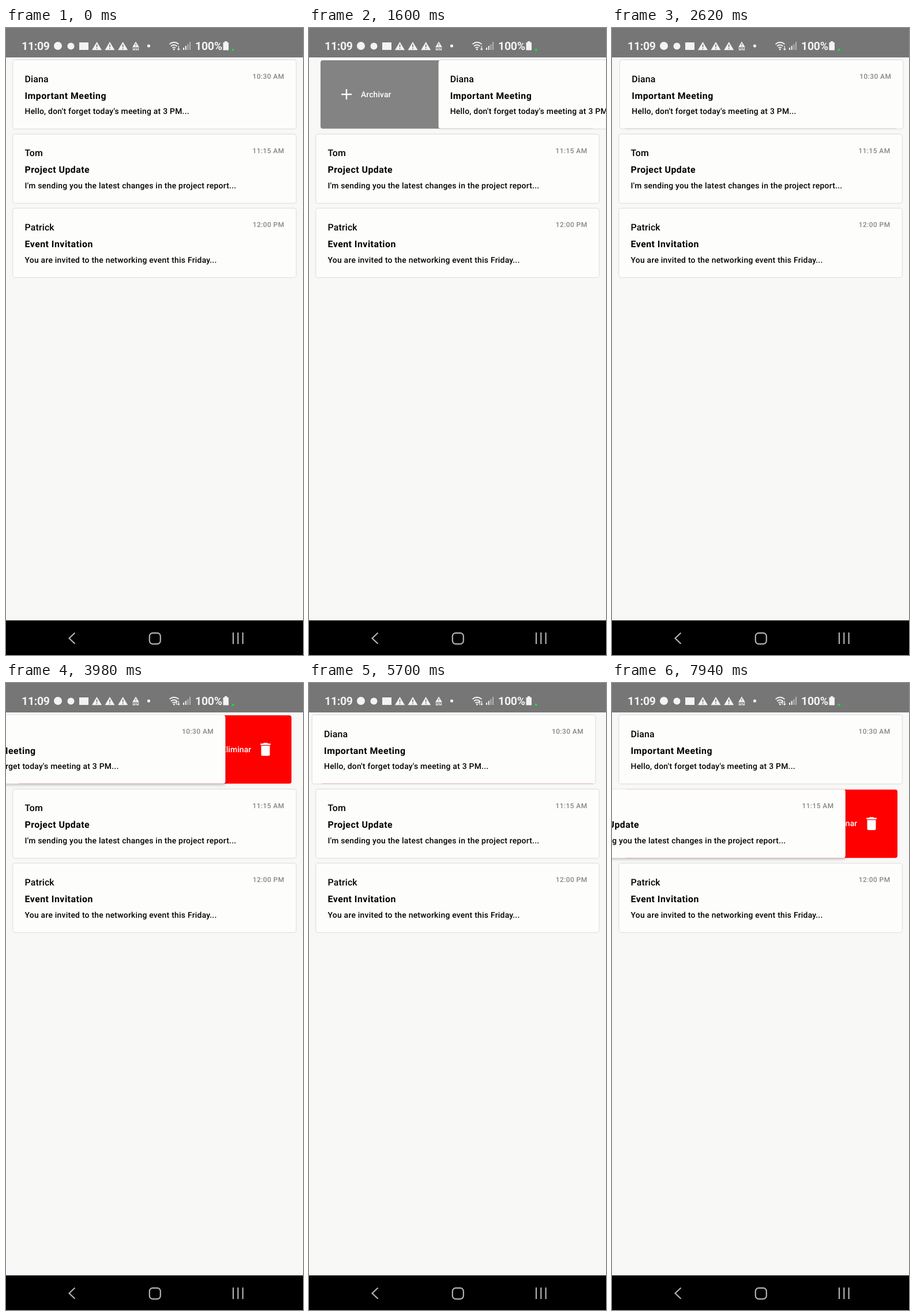
Write an HTML page that moves like this. It is 515x1087 px and loops after 8000 ms.

```html
<!DOCTYPE html>
<html lang="en">
<head>
<meta charset="utf-8">
<title>Swipeable inbox</title>
<style>
  html, body { margin: 0; width: 100%; height: 100%; overflow: hidden; background: #f8f8f7; }
  svg { display: block; width: 100%; height: 100%; }
  text { font-family: Roboto, sans-serif; font-weight: 500; text-rendering: geometricPrecision; }
  .name { font-size: 15.9px; letter-spacing: .15px; }
  .title { font-size: 15.9px; font-weight: 700; letter-spacing: .48px; }
  .body { font-size: 13.9px; letter-spacing: .25px; }
  .time { font-size: 11.9px; letter-spacing: .45px; fill: #858585; text-anchor: end; }
  .action { font-size: 13.9px; letter-spacing: .1px; fill: #fff; }
  .end { text-anchor: end; }
  .status { font-size: 19.5px; font-weight: 700; letter-spacing: -.3px; }
  .tiny { font-size: 6px; font-weight: 700; letter-spacing: .5px; text-anchor: middle; }
  .sheet { fill: #fdfdfb; filter: drop-shadow(0 .8px 1.1px rgba(0, 0, 0, .26)); }
  .lifted .sheet { filter: drop-shadow(0 2px 2.5px rgba(0, 0, 0, .26)); }
</style>
</head>
<body>
<svg viewBox="0 0 515 1087">
  <rect width="515" height="1087" fill="#f8f8f7"/>
  <g id="list"></g>

  <g fill="#f3f3f3">
    <rect width="515" height="51" fill="#767676"/>
    <text class="status" x="27" y="38">11:09</text>
    <circle cx="90" cy="31" r="7"/>
    <circle cx="112.5" cy="31.5" r="6"/>
    <rect x="127" y="25" width="16" height="13"/>
    <g id="warnings"></g>
    <path d="M225 23.5l6 10h-12z"/>
    <path d="M225 27v3m0 1v1.3" stroke="#767676" stroke-width="1.2"/>
    <text class="tiny" x="225.2" y="39.3">MM</text>
    <circle cx="247.5" cy="31" r="2.6"/>
    <g fill="none" stroke="#f3f3f3" stroke-width="1.7">
      <path d="M283.5 28q7.8-6.5 16 0M286 31.5q5.5-4.5 10.5 0M288.5 34.6q3-2.5 5.5 0"/>
      <path d="M299.3 31v7m-2-2.2l2 2.2l2-2.2" stroke-width="1.2"/>
      <path id="up" d="M295.5 38v-6.5m-1.7 2l1.7-2l1.7 2" stroke-width="1.2"/>
    </g>
    <circle cx="291.3" cy="37" r="1.5"/>
    <path d="M307 34h2v4h-2zM310.700 31h2v7h-2z"/>
    <path d="M314.4 28h2v10h-2zM318.1 24h2v14h-2z" opacity=".5"/>
    <text class="status" x="328" y="38">100%</text>
    <path d="M379 23h4.500v2h2.500v13.500h-9.500V25h2.500z"/>
    <circle cx="393.7" cy="37.7" r="2" fill="#12e03c"/>
  </g>

  <rect y="1027" width="515" height="60"/>
  <g fill="none" stroke="#b2b2b2" stroke-width="2.2">
    <path d="M119.5 1048.5l-10 9.5l10 9.5M394 1048v20M402.3 1048v20M410.6 1048v20"/>
    <rect x="248.8" y="1048.8" width="19" height="19" rx="5.5"/>
  </g>
</svg>
<script>
const LOOP = 8000;
const PITCH = 128.7;
const mails = [
  ["Diana", "Important Meeting", "Hello, don't forget today's meeting at 3 PM...", "10:30 AM"],
  ["Tom", "Project Update", "I'm sending you the latest changes in the project report...", "11:15 AM"],
  ["Patrick", "Event Invitation", "You are invited to the networking event this Friday...", "12:00 PM"]
];
const $ = id => document.getElementById(id);

$("warnings").innerHTML = [157.5, 180, 202.7].map(x =>
  `<path d="M${x} 24l8.5 14.3h-17z"/>
   <path d="M${x} 28.5v4.7m0 1.5v1.8" stroke="#767676" stroke-width="1.7"/>`).join("");

const backing = color =>
  `<rect x="20" y="56" width="475" height="118.5" rx="4" fill="${color}"/>`;

$("list").innerHTML = mails.map(([name, title, body, time], i) => `
  <g transform="translate(0 ${i * PITCH})">
    <g class="archive">
      ${backing("#838383")}
      <path d="M56 115h18M65 106v18" stroke="#fff" stroke-width="2.4"/>
      <text class="action" x="90" y="119.5">Archivar</text>
    </g>
    <g class="delete">
      ${backing("#f00")}
      <path transform="translate(435 100) scale(1.25)" fill="#fff"
        d="M6 19q0 2 2 2h8q2 0 2-2V7H6zM19 4h-3.5l-1-1h-5l-1 1H5v2h14z"/>
      <text class="action end" x="425.3" y="119.5">Eliminar</text>
    </g>
    <g class="card">
      <rect class="sheet" x="12.2" y="55.7" width="490.6" height="118.8" rx="4"/>
      <text class="name" x="32.5" y="93.5">${name}</text>
      <text class="title" x="32.5" y="122.8">${title}</text>
      <text class="body" x="32.5" y="149.3">${body}</text>
      <text class="time" x="482.5" y="88">${time}</text>
    </g>
  </g>`).join("");

const rows = [...$("list").children].map(row => ({
  card: row.querySelector(".card"),
  archive: row.querySelector(".archive"),
  remove: row.querySelector(".delete")
}));

function drag(t, start, end, from, to) {
  const p = Math.min(1, Math.max(0, (t - start) / (end - start)));
  return from + (to - from) * p * p * (3 - 2 * p);
}

// Spring back to rest with a damping ratio of one half.
function spring(ms, from, rate) {
  const s = Math.max(0, ms) / 1000;
  const damping = rate / 2;
  const w = rate * Math.sqrt(.75);
  return from * Math.exp(-damping * s) * (Math.cos(w * s) + damping / w * Math.sin(w * s));
}

function firstOffset(t) {
  if (t < 1590) return drag(t, 480, 1080, 0, 212.7);
  if (t < 3280) return spring(t - 1590, 212.7, 6.05);
  if (t < 4100) return drag(t, 3280, 4000, 0, -122.6);
  if (t < 4690) return drag(t, 4100, 4280, -122.6, -245);
  return spring(t - 4690, -245, 7.07);
}

function place({ card, archive, remove }, x, lifted) {
  card.setAttribute("transform", `translate(${x.toFixed(2)} 0)`);
  card.classList.toggle("lifted", lifted);
  archive.style.display = x > .5 ? "" : "none";
  remove.style.display = x < -.5 ? "" : "none";
}

function draw() {
  const t = performance.now() % LOOP;
  place(rows[0], firstOffset(t), t > 3300 && t < 4690);
  place(rows[1], drag(t, 7740, 7940, 0, -98), t > 7740);
  place(rows[2], 0, false);
  $("up").style.display = t < 3300 ? "none" : "";
  requestAnimationFrame(draw);
}
draw();
</script>
</body>
</html>
```
